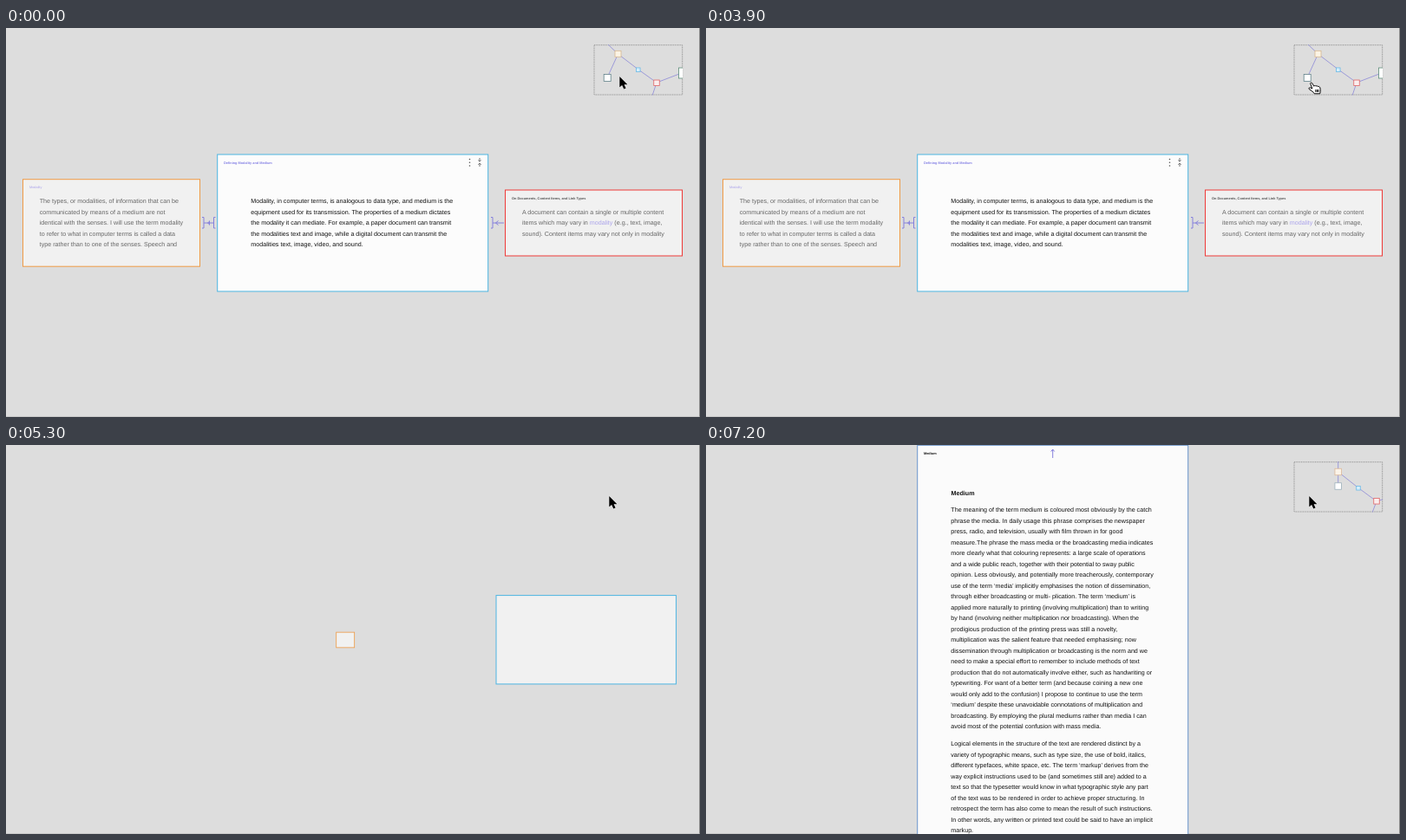
Recreate the animation shown at these times as an HTML page. Size 800 px wide and 449 px high, loop 7700 ms.

```html
<!DOCTYPE html>
<html lang="en">
<head>
<meta charset="utf-8">
<title>Linked documents</title>
<style>
  html, body { margin: 0; width: 100%; height: 100%; overflow: hidden; background: #ddd; }
  svg { display: block; width: 800px; height: 449px; }
  text { font-family: "Liberation Sans", Arial, sans-serif; font-size: 7.15px; text-rendering: geometricPrecision; white-space: pre; }
  .title { font-size: 3.87px; font-weight: bold; }
  .link { stroke: #8580dc; fill: none; }
  .side { fill: #666; }
</style>
</head>
<body>
<svg viewBox="0 0 800 449">
  <defs>
    <clipPath id="view"><rect width="780" height="449"/></clipPath>
    <clipPath id="mapView"><rect x="678" y="19" width="102" height="58.5"/></clipPath>
  </defs>
  <path d="M799.5 0V449" stroke="#8a8a8a"/>
  <path d="M0 448.7H800" stroke="#b4b4b4" stroke-width=".6"/>
  <g clip-path="url(#view)">
    <rect id="orange" stroke="#ee9a45" fill="#f1f1f1"/>
    <rect id="blue" stroke="#4db5e2"/>
    <rect id="page" fill="#fbfbfb"/>
  </g>
  <g id="red">
    <rect x="575.5" y="187" width="204" height="76" fill="#f1f1f1" stroke="#ee3a38"/>
    <text class="title" x="583" y="198" fill="#555">On Documents, Content Items, and Link Types</text>
    <g id="redText" class="side"></g>
  </g>
  <g id="links" class="link">
    <path d="M226 218.5H228V231H226M228 225H239.5M241.5 218.5H239.5V231H241.5M235 223L232.5 225L235 227M234.5 222.5V227.5"/>
    <path d="M559 218.5H561V231H559M561 225H574M567.5 222.5L564.5 225L567.5 227.5"/>
  </g>
  <g id="cardText">
    <text class="title" x="27" y="185.4" fill="#aaa2ea" style="font-weight:normal">Modality</text>
    <g id="orangeText" class="side"></g>
    <text class="title" x="251" y="156.6" fill="#8580e4">Defining Modality and Medium</text>
    <g id="blueText" fill="#111"></g>
    <g fill="#555">
      <circle cx="534.5" cy="151.5" r=".8"/><circle cx="534.5" cy="155.2" r=".8"/><circle cx="534.5" cy="159" r=".8"/>
    </g>
    <path d="M546 150V154M544.3 152.5L546 154.2L547.7 152.5M546 160V156M544.3 157.8L546 156.1L547.7 157.8" fill="none" stroke="#555" stroke-width=".8"/>
  </g>
  <g id="pageText" fill="#111">
    <text class="title" x="251" y="11.4">Medium</text>
    <path class="link" d="M399.7 15V5M397.7 7.5L399.7 5L401.7 7.5"/>
    <text x="282.5" y="57.6" font-weight="bold">Medium</text>
    <g id="para0"></g>
    <g id="para1"></g>
  </g>
  <path id="peek" d="M392 448.5H407" stroke="#777" stroke-dasharray="2 .8"/>
  <g id="mapBefore"></g>
  <g id="mapAfter"></g>
  <path id="arrow" d="M.3 0V12.6L3.1 10L5.3 14.4L7.6 13.4L5.6 9.2H9.4Z" fill="#000" stroke="#fff" stroke-width=".7" paint-order="stroke"/>
  <path id="hand" d="M.3 1.5C-.2 .2 1.4 -.6 2.2 .6L4.2 4.2C5 3.2 6.2 3.4 6.5 4.2C7.3 3.4 8.5 3.7 8.8 4.6C9.8 4 10.9 4.6 11.2 5.6C11.8 7.8 12.2 9.3 11.2 12.8H4.8C4 10.8 1.2 9.4 -1.2 7.6C-2.2 6.4 -.7 5.3 .4 6L2.4 7Z M6.3 8V11M8 8V11M9.6 8V11" fill="#fff" stroke="#000" stroke-linejoin="round"/>
</svg>
<script>
const LOOP = 7700, STEP = 100, LINE = 12.5;
const $ = id => document.getElementById(id);

function write(id, x, y, copy) {
  $(id).innerHTML = copy.trim().split('\n')
    .map((line, i) => `<text x="${x}" y="${y + i * LINE}">${line}</text>`).join('');
}

write('orangeText', 38.7, 202.3, `
The types, or modalities, of information that can be
communicated by means of a medium are not
identical with the senses. I will use the term modality
to refer to what in computer terms is called a data
type rather than to one of the senses. Speech and`);

write('blueText', 282.3, 202.3, `
Modality, in computer terms, is analogous to data type, and medium is the
equipment used for its transmission. The properties of a medium dictates
the modality it can mediate. For example, a paper document can transmit
the modalities text and image, while a digital document can transmit the
modalities text, image, video, and sound.`);

write('redText', 595, 214.8, `
A document can contain a single or multiple content
items which may vary in <tspan fill="#aaa2ea">modality</tspan> (e.g., text, image,
sound). Content items may vary not only in modality`);

write('para0', 282.3, 77.4, `
The meaning of the term medium is coloured most obviously by the catch
phrase the media. In daily usage this phrase comprises the newspaper
press, radio, and television, usually with film thrown in for good
measure.The phrase the mass media or the broadcasting media indicates
more clearly what that colouring represents: a large scale of operations
and a wide public reach, together with their potential to sway public
opinion. Less obviously, and potentially more treacherously, contemporary
use of the term ‘media’ implicitly emphasises the notion of dissemination,
through either broadcasting or multi- plication. The term ‘medium’ is
applied more naturally to printing (involving multiplication) than to writing
by hand (involving neither multiplication nor broadcasting). When the
prodigious production of the printing press was still a novelty,
multiplication was the salient feature that needed emphasising; now
dissemination through multiplication or broadcasting is the norm and we
need to make a special effort to remember to include methods of text
production that do not automatically involve either, such as handwriting or
typewriting. For want of a better term (and because coining a new one
would only add to the confusion) I propose to continue to use the term
‘medium’ despite these unavoidable connotations of multiplication and
broadcasting. By employing the plural mediums rather than media I can
avoid most of the potential confusion with mass media.`);

write('para1', 282.3, 347.4, `
Logical elements in the structure of the text are rendered distinct by a
variety of typographic means, such as type size, the use of bold, italics,
different typefaces, white space, etc. The term ‘markup’ derives from the
way explicit instructions used to be (and sometimes still are) added to a
text so that the typesetter would know in what typographic style any part
of the text was to be rendered in order to achieve proper structuring. In
retrospect the term has also come to mean the result of such instructions.
In other words, any written or printed text could be said to have an implicit
markup.`);

const node = (x, y, w, h, stroke, fill = '#fff') =>
  `<rect x="${x - w / 2}" y="${y - h / 2}" width="${w}" height="${h}" stroke="${stroke}" fill="${fill}" stroke-width=".8"/>`;

function drawMap(id, edges, nodes) {
  $(id).innerHTML = `<rect x="678" y="19.7" width="101.7" height="57.3" fill="none" stroke="#888" stroke-width=".8" stroke-dasharray="1 .6"/>
    <g clip-path="url(#mapView)"><path d="${edges}" fill="none" stroke="#9692d8" stroke-width=".9"/>${nodes.join('')}</g>`;
}

drawMap('mapBefore', 'M694 19L705.5 30L729 48L750 63L780 51.5M705.5 30L693 57.5M750 63L745 78', [
  node(705.5, 29.8, 7, 7, '#d8b890', '#fbf3e4'),
  node(693.2, 57.5, 8, 8, '#608088'),
  node(728.8, 48.2, 4.5, 4.5, '#68b8e6', '#d8effb'),
  node(750, 63.3, 6.5, 6.5, '#e06464', '#fbeeee'),
  node(778.5, 52, 6, 12, '#5c8c78')
]);
drawMap('mapAfter', 'M728.7 19V48M728.7 31L752 49.5L773 65L781 62.5M773 65L768 78', [
  node(728.7, 31, 7.5, 7.5, '#dcb89a', '#fbf3e8'),
  node(728.7, 47.5, 7.5, 7.5, '#9cb0ba'),
  node(752, 49.8, 4.5, 4.5, '#68b8e6', '#d8effb'),
  node(773, 64.8, 6.5, 6.5, '#e06464', '#fbeeee')
]);

const lerp = (a, b, p) => a + (b - a) * p;
const ramp = (t, from, to) => Math.min(1, Math.max(0, (t - from) / (to - from)));

// The CSS "ease" curve, solved by bisection.
function ease(x) {
  const curve = (s, a, b) => 3 * (1 - s) ** 2 * s * a + 3 * (1 - s) * s * s * b + s ** 3;
  let lo = 0, hi = 1;
  for (let i = 0; i < 20; i++) {
    const mid = (lo + hi) / 2;
    if (curve(mid, .25, .25) < x) lo = mid; else hi = mid;
  }
  return x >= 1 ? 1 : curve(lo, .1, 1);
}

function set(id, attrs) {
  for (const name in attrs) $(id).setAttribute(name, attrs[name]);
}
const show = (id, opacity) => {
  $(id).style.opacity = opacity;
  $(id).style.display = opacity > 0 ? '' : 'none';
};
function place(id, from, to, p) {
  const [x, y, width, height] = from.map((v, i) => lerp(v, to[i], p));
  set(id, { x, y, width, height });
}

// time, x, y of the pointer tip
const pointer = [
  [0, 707, 56], [800, 712, 51], [900, 714, 50], [1500, 728, 48], [1700, 727, 47],
  [2300, 704, 34], [2500, 703, 36], [2700, 698, 43], [3200, 695, 59], [LOOP, 695, 59]
];
function pointerAt(t) {
  const i = pointer.findIndex(k => k[0] > t);
  const a = pointer[i - 1], b = pointer[i];
  const p = ramp(t, a[0], b[0]);
  return [lerp(a[1], b[1], p), lerp(a[2], b[2], p)];
}

const SMALL = [392.5, 217.5, 15, 15];
const BLUE_SIDE = [575.5, 174.5, 204, 100.5];

function draw(t) {
  const slide = ease(ramp(t, 4768, 5455));
  const open = ease(ramp(t, 5440, 6140));
  const moving = t >= 4800;

  place('orange', [19.5, 174.7, 204, 100.5], SMALL, slide);
  set('orange', { 'stroke-width': lerp(1, .7, slide) + Math.sin(Math.PI * slide) });
  show('orange', t < 5500 ? 1 : 0);

  if (open > 0) place('blue', BLUE_SIDE, [780.5, 174.5, 204, 100.5], open);
  else place('blue', [243.7, 146, 312, 158], BLUE_SIDE, slide);
  set('blue', { fill: moving ? '#f1f1f1' : '#fcfcfc' });
  show('blue', t < 6200 ? 1 : 0);

  if (t < 6200) place('page', SMALL, [243.5, -28, 312, 394], open);
  else set('page', { x: 243.7, y: .3, width: 312, height: 460 });
  set('page', { stroke: t < 6200 ? '#4f9484' : '#6a94cc' });
  show('page', t >= 5500 ? 1 : 0);
  show('peek', t >= 5800 && t < 6100 ? 1 : 0);

  const leaving = 1 - ramp(t, 4300, 4700);
  show('red', leaving);
  show('links', leaving);
  show('mapBefore', leaving);
  show('cardText', moving ? 0 : 1);

  const arriving = ramp(t, 6200, 6800);
  show('pageText', arriving);
  show('mapAfter', arriving);

  const hover = t >= 3200 && t < 4400;
  const [x, y] = pointerAt(t);
  const nudge = ramp(t, 3600, 3900);
  set('arrow', { transform: `translate(${x} ${y})` });
  set('hand', { transform: `translate(${lerp(694, 696.5, nudge)} ${lerp(60, 63, nudge)})` });
  show('arrow', hover ? 0 : 1);
  show('hand', hover ? 1 : 0);
}

const start = performance.now();
function tick() {
  const t = (performance.now() - start) % LOOP;
  draw(Math.floor(t / STEP) * STEP);
  requestAnimationFrame(tick);
}
tick();
</script>
</body>
</html>
```
